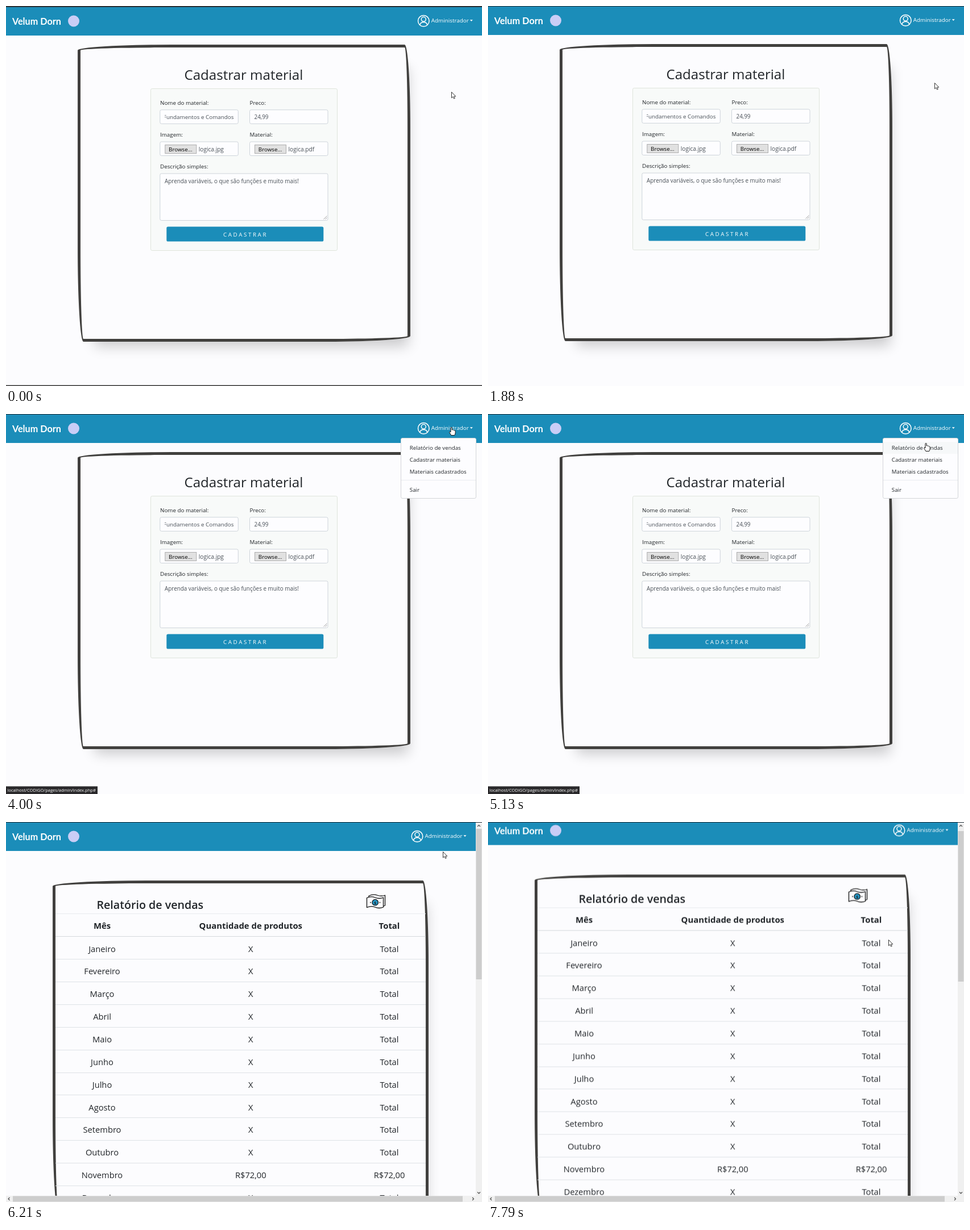
Recreate the animation shown at these times as an HTML page. Size 837 by 669 pixels, loop 8000 ms.

```html
<!DOCTYPE html>
<html lang="pt">
<head>
<meta charset="utf-8">
<title>Painel</title>
<style>
html, body { margin: 0; width: 100%; height: 100%; overflow: hidden; background: #fcfcfe; }
#stage { position: relative; width: 837px; height: 669px; overflow: hidden; background: #fcfcfe; }
.page, svg { position: absolute; left: 0; top: 0; width: 837px; height: 669px; }
.view { position: absolute; left: 0; top: 0; width: 837px; height: 669px; overflow: hidden; background: #fcfcfe; }
#report { opacity: 0; }
.card {
  position: absolute; box-sizing: border-box; border: 5px solid #41403e;
  border-radius: 166px 10px 146px 10px / 10px 146px 10px 166px;
  box-shadow: 13px 25px 22px -17px rgba(0, 0, 0, .2);
}
svg text { font-family: "Open Sans", "Noto Sans", sans-serif; white-space: pre; }
</style>
</head>
<body>
<div id="stage">
  <div class="view" id="form">
    <div class="page" id="formPage">
      <div class="card" style="left:126px;top:67px;width:585px;height:523px"></div>
      <svg id="formArt"></svg>
    </div>
  </div>
  <div class="view" id="report">
    <div class="page" id="reportPage">
      <div class="card" style="left:82px;top:103px;width:661px;height:582px"></div>
      <svg id="reportArt"></svg>
    </div>
    <svg id="bars"></svg>
  </div>
  <svg id="over"></svg>
</div>
<script>
const LOOP = 8000, BLUE = '#1b8db9', INK = '#212529', GRAY = '#495057';
const $ = id => document.getElementById(id);

// markup helpers
const rect = (x, y, w, h, fill, stroke = 'none', r = 0) =>
  `<rect x="${x}" y="${y}" width="${w}" height="${h}" rx="${r}" fill="${fill}" stroke="${stroke}"/>`;
const text = (s, x, y, size, fill = INK, more = '') =>
  `<text x="${x}" y="${y}" font-size="${size}" fill="${fill}" ${more}>${s}</text>`;
const mid = (s, x, y, size, weight = 400) =>
  text(s, x, y, size, INK, `text-anchor="middle" font-weight="${weight}"`);
const path = (d, stroke, width = 1, fill = 'none') =>
  `<path d="${d}" stroke="${stroke}" stroke-width="${width}" fill="${fill}" stroke-linejoin="round"/>`;
const dot = (x, y, r, fill, more = '') => `<circle cx="${x}" cy="${y}" r="${r}" fill="${fill}" ${more}/>`;

// navigation bar; x is the centre of the user icon
const nav = (w, x) =>
  rect(0, 0, w, 51, BLUE) +
  text('Velum Dorn', 11, 31.5, 16.2, '#fff', 'font-weight="700" style="font-family:Lato,sans-serif"') +
  dot(119, 25.5, 10, '#c9cdf6') +
  dot(x, 25.3, 9.8, 'none', 'stroke="#fff" stroke-width="1.5"') +
  dot(x, 22.3, 4, 'none', 'stroke="#fff" stroke-width="1.5"') +
  path(`M${x - 6.5} 32.2C${x - 5} 25.8 ${x + 5} 25.8 ${x + 6.5} 32.2`, '#fff', 1.5) +
  text('Administrador', x + 13.5, 28, 9.85, '#fff') +
  path(`M${x + 81.5} 23.2h5l-2.5 2.7z`, 'none', 0, '#fff');

const field = (x, y, w = 137.5, h = 24.5) => rect(x, y, w, h, '#fdfdff', '#ced4da', 2.6);
const picker = (x, name) =>
  field(x, 238) +
  rect(x + 9, 243.5, 55, 15, '#e1e1e1', '#adadad') +
  text('Browse...', x + 15.3, 254.7, 9.8, '#000', 'font-weight="500"') +
  text(name, x + 68, 254.7, 10.1, GRAY);
const label = (s, x, y) => text(s, x, y, 9.8);

$('formArt').innerHTML =
  nav(837, 734.3) +
  text('Cadastrar material', 313.5, 128.8, 24.1) +
  rect(254.5, 144.5, 328, 285, '#f8faf9', '#dfe5dc', 2.6) +
  label('Nome do material:', 271, 172.5) + label('Preco:', 428.5, 172.5) +
  field(270.8, 181.8) + field(428.5, 181.8) +
  '<clipPath id="clip"><rect x="279" y="182" width="122" height="24"/></clipPath>' +
  '<g clip-path="url(#clip)">' +
  text('Fundamentos e Comandos', 400.5, 198, 9.85, GRAY, 'text-anchor="end"') + '</g>' +
  text('24,99', 436.5, 198, 9.9, GRAY) +
  label('Imagem:', 271, 228.8) + label('Material:', 428.5, 228.8) +
  picker(270.8, 'logica.jpg') + picker(428.5, 'logica.pdf') +
  label('Descrição simples:', 271, 285) +
  field(270.8, 294, 295.2, 82.5) +
  text('Aprenda variáveis, o que são funções e muito mais!', 279, 310.5, 9.9, GRAY) +
  path('M558.5 374.5l6-6M561.5 374.5l3-3', '#999', .9) +
  rect(282.3, 387.5, 276, 26, BLUE, 'none', 2.6) +
  text('CADASTRAR', 382, 405, 9.8, '#fff', 'letter-spacing="2.6"');

// sales table
const months = 'Janeiro Fevereiro Março Abril Maio Junho Julho Agosto Setembro Outubro Novembro Dezembro'.split(' ');
const ROW = 39.87;
const rule = (y, color = '#dee2e6') => rect(87, y, 651, 1, color);
const row = (cells, y, size, weight) => cells.map((s, i) => mid(s, [169, 430.3, 674][i], y, size, weight)).join('');
$('reportArt').innerHTML =
  nav(826, 723) +
  text('Relatório de vendas', 159.5, 153, 19.65, INK, 'font-weight="600"') +
  path('M638 133V130Q646 126.500 653 129T666.500 129V147L663 148.500', '#111', 1.3, '#fcfcfe') +
  path('M634.500 133.500Q642 130 649 133T663.500 133V150Q656 153 649 150T634.500 150.500Z', '#111', 1.3, '#fcfcfe') +
  dot(649.2, 141.7, 5.3, '#2596c4', 'stroke="#111" stroke-width="1.2"') +
  mid('$', 649.2, 144.5, 7.5, 700) +
  dot(641, 141.7, .9, '#111') + dot(657.4, 141.7, .9, '#111') +
  rule(161, '#e8ebee') +
  row(['Mês', 'Quantidade de produtos', 'Total'], 188.3, 14.9, 700) +
  months.map((m, i) => {
    const sum = m === 'Novembro' && 'R$72,00';
    return rule(Math.round(201.4 + i * ROW), i ? undefined : '#d5d9dd') +
      row([m, sum || 'X', sum || 'Total'], 228.5 + i * ROW, 14.7, 400);
  }).join('');

$('bars').innerHTML =
  rect(826, 0, 11, 669, '#f0f0f0') + rect(0, 658, 837, 11, '#f0f0f0') +
  `<g id="thumb">${rect(826.5, 12, 10, 265, '#cdcdcd')}</g>` +
  rect(12, 658.5, 791, 10, '#cdcdcd') +
  path('M829 8l2.5-2.5 2.5 2.5M829 651.5l2.5 2.5 2.5-2.5M6.5 661l-2.5 2.5 2.5 2.5M820 661l2.5 2.5-2.5 2.5', '#505050', 1.2);

const item = (s, y) => text(s, 709.8, y, 9.75);
$('over').innerHTML =
  '<g id="menu" opacity="0">' +
  rect(694.5, 42.5, 132, 106, '#fdfdff', '#d3d5d8', 2.6) +
  `<g id="hover" opacity="0">${rect(695, 49, 131, 21, '#f6f8f9')}</g>` +
  item('Relatório de vendas', 63.3) + item('Cadastrar materiais', 84.3) +
  item('Materiais cadastrados', 105.3) + rect(695, 116, 131, 1, '#e9ecef') + item('Sair', 137) + '</g>' +
  '<g id="status" opacity="0">' + rect(0, 655.5, 161, 13.5, '#2b2a2c') +
  text('localhost/CODIGO/pages/admin/index.php#', 2.5, 665.3, 7.55, '#fff') + '</g>' +
  rect(0, 0, 837, 1, '#22303a') +
  `<g id="edges">${rect(0, 0, 837, 2, '#2b3338') + rect(0, 667.5, 837, 1.5, '#333')}</g>` +
  '<g id="cursor"><g id="arrow">' +
  path('M.5 .5V10.8L2.9 8.7 4.6 12.2 6.3 11.4 4.7 8.1H7.8Z', '#222', .9, '#fff') + '</g>' +
  '<g id="hand" opacity="0">' +
  path('M-1 8V1.2Q0 -.5 1.2 1.2V5Q2.5 4 3.4 5.4 4.7 4.6 5.5 6 6.8 5.6 7.2 7V10Q7 12 5.8 14.5H-.2Q-1.5 12 -3.3 9.5 -3.4 7.5 -1 8.8Z', '#111', 1, '#fff') +
  '</g></g>';

// rows: [time, value, steps to the next value]
function play(el, prop, rows) {
  const frames = rows.map(([t, v, n = 1]) => ({ offset: t / LOOP, [prop]: v, easing: `steps(${n})` }));
  frames.push({ offset: 1, [prop]: rows[rows.length - 1][1] });
  $(el).animate(frames, { duration: LOOP, iterations: Infinity });
}
const move = (x, y) => `translate(${x}px, ${y}px)`;
const show = (el, from, to) =>
  play(el, 'opacity', from ? [[0, 0], [from, 1], [to, 0]] : [[0, 1], [to, 0]]);

play('formPage', 'transform', [[0, move(0, 1)], [250, move(0, 0)]]);
play('reportPage', 'transform', [[0, move(0, 0)], [7790, move(0, -10.5)]]);
play('thumb', 'transform', [[0, move(0, 0)], [7790, move(0, 4)]]);
show('edges', 0, 250);
show('menu', 2670, 5840);
show('hover', 4920, 5840);
show('status', 2557, 6000);
show('hand', 2557, 5840);
play('arrow', 'opacity', [[0, 1], [2557, 0], [5840, 1]]);
play('report', 'opacity', [[0, 0], [6210, 1]]);
play('cursor', 'transform', [
  [0, move(783, 151)],
  [1880, move(785, 135), 7],
  [2670, move(783, 23)],
  [4500, move(783, 23), 6],
  [5130, move(770, 51)],
  [5340, move(768, 52)],
  [6380, move(768, 54), 5],
  [6920, move(742, 107)],
  [7090, move(708, 175)],
  [7250, move(704, 192)],
  [7460, move(704, 207)]
]);
</script>
</body>
</html>
```
